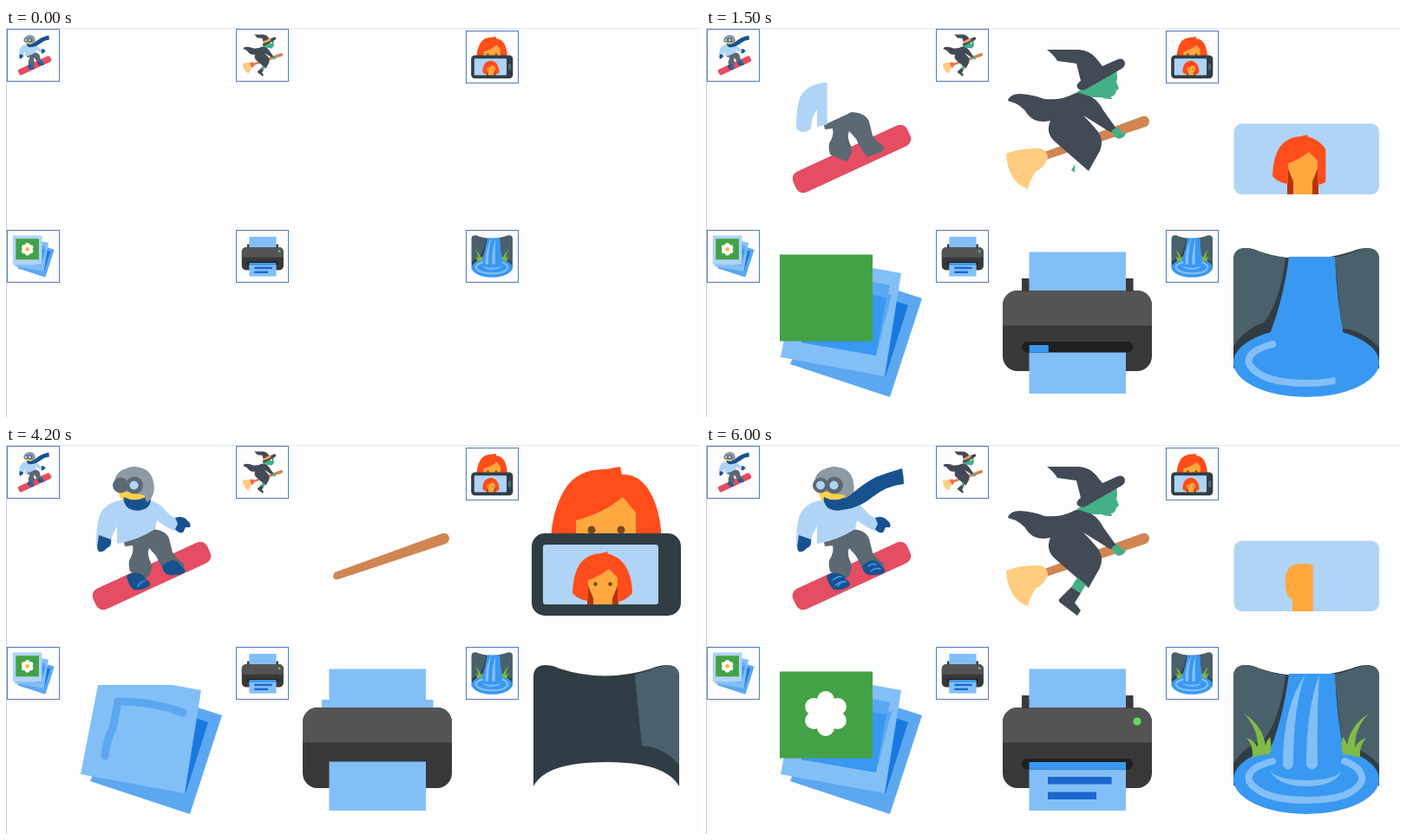
These frames come from a looping animation (800 by 449 pixels, 6100 ms). An HTML page:

```html
<!DOCTYPE html>
<html lang="en">
<head>
<meta charset="utf-8">
<title>Icons drawn layer by layer</title>
<style>
html, body { margin: 0; width: 100%; height: 100%; overflow: hidden; background: #fdfdfd; }
svg { display: block; width: 100vw; height: 100vh; }
</style>
</head>
<body>
<svg id="stage" viewBox="0 0 800 449"></svg>
<script>
const LOOP = 6100, STEP = 100, THUMB_SCALE = 0.28;
const stage = document.getElementById('stage');

const box = (x, y, w, h) => `M${x} ${y}h${w}v${h}h${-w}Z`;
const rounded = (x, y, w, h, r) =>
  `M${x + r} ${y}h${w - 2 * r}a${r} ${r} 0 0 1 ${r} ${r}v${h - 2 * r}a${r} ${r} 0 0 1 ${-r} ${r}` +
  `h${2 * r - w}a${r} ${r} 0 0 1 ${-r} ${-r}v${2 * r - h}a${r} ${r} 0 0 1 ${r} ${-r}Z`;
const oval = (x, y, rx, ry = rx) =>
  `M${x - rx} ${y}a${rx} ${ry} 0 1 1 ${2 * rx} 0a${rx} ${ry} 0 1 1 ${-2 * rx} 0Z`;
const flower = (x, y, reach, r) => oval(x, y, 12) + [...Array(6).keys()].map(i => {
  const a = Math.PI / 2 + i * Math.PI / 3;
  return oval(x + reach * Math.cos(a), y + reach * Math.sin(a), r);
}).join('');
const line = (color, width) =>
  ({ fill: 'none', stroke: color, 'stroke-width': width, 'stroke-linecap': 'round', 'stroke-linejoin': 'round' });
const holed = { 'fill-rule': 'evenodd' };

const PALE = '#b0d4f6', SKY = '#82bff7', MID = '#5ba8f1', BLUE = '#3998f2', NAVY = '#17528f';
const SLATE = '#5c6872', INK = '#424a56', GREEN = '#44b085';
const SKIN = '#ffa83e', HAIR = '#ff4d1c', BROWN = '#784719', SHELL = '#303d44', ROCK = '#4a616b';
const GRASS = 'M630 361Q631 346 623 338Q632 341 636 349Q636 326 620 310Q642 324 645 347Q646 341 650 337Q653 348 650 357Q640 357 630 361Z';

// Each layer: start, end, colour, path, extra attributes.
const icons = [
  { name: 'snowboarder', frame: [1.5, 1.5], thumb: [-14, 1], period: LOOP, layers: [
    [60, 700, '#e44d62', rounded(95.5, 138, 145, 26, 9), { transform: 'rotate(-24.8 168 151)' }],
    [800, 1300, SLATE, 'M136 112L168 97Q184 98 188 108L192 124Q196 131 205 137Q206 143 196 145L186 149L179 140Q176 134 173 128L165 119Q162 126 167 136Q170 145 162 154L143 146Q141 138 142 133Q148 124 146 116L137 117Z'],
    [1300, 1900, PALE, 'M136 63Q114 66 108 81Q104 92 104 116Q112 124 121 116Q121 104 128 94V114Q152 110 172 97L174 87Q180 91 186 95L194 99Q204 98 211 93Q208 88 199 86Q190 83 184 76Q177 66 163 63Z'],
    [1900, 2150, '#fdd04c', 'M146 29Q165 30 165 47L164 55Q160 68 147 69Q132 68 130 55Q126 30 146 29Z'],
    [2150, 2400, NAVY, 'M139 151Q145 146 152 148Q160 150 161 155Q168 158 165 163Q158 168 147 167Q140 160 139 151Z'],
    [2500, 2750, NAVY, 'M180 140Q186 133 193 133Q199 134 201 139Q208 143 206 147Q200 151 188 150Q181 148 180 140Z'],
    [2750, 3000, NAVY, 'M136 60Q150 68 166 57Q169 66 163 72Q152 79 141 73Q134 66 136 60Z'],
    [3000, 3300, NAVY, 'M195 84Q204 81 209 87Q214 91 212 95L207 95L204 101Q198 102 195 97L198 91Z'],
    [3300, 3450, BLUE, 'M152 163Q156 157 160 157', line(BLUE, 1.6)],
    [3520, 3800, '#8d9aa4', 'M146 25Q167 25 170 43Q173 58 163 66Q160 64 160 58L127 52Q119 30 146 25Z'],
    [3800, 3950, NAVY, 'M107 104L121 109Q122 117 116 119Q113 124 107 123Q104 120 106 112Z'],
    [3950, 4100, SLATE, oval(132, 46.5, 9) + oval(148, 46.5, 10)],
    [4100, 4200, PALE, oval(147.5, 46.5, 5)],
    [4300, 4450, PALE, oval(132, 46.5, 5)],
    [4500, 5150, NAVY, 'M136 64Q148 72 166 58Q182 44 196 37Q212 31 226 27Q228 36 228 45Q208 47 192 60Q172 76 150 75Q138 73 136 64Z'],
    [5200, 5600, BLUE, 'M146 156Q152 151 156 152M149 162Q155 157 161 158', line(BLUE, 1.6)],
    [5600, 5950, BLUE, 'M187 140Q192 136 196 138M190 146Q195 141 201 143', line(BLUE, 1.6)]
  ] },
  { name: 'witch', frame: [265.5, 1.5], thumb: [176, 0.5], period: 4000, layers: [
    [30, 180, '#d08552', 'M379 147L503 102Q510 101 511 107Q511 112 507 114L383 155Q377 156 377 151Z'],
    [220, 350, '#ffcc80', 'M346 145Q362 138 386 139Q394 142 394 150Q390 161 381 165Q374 173 371 186Q348 178 346 145Z'],
    [350, 550, INK, 'M348 84Q350 76 362 76Q378 77 390 82Q410 84 426 75Q437 72 445 80Q453 85 458 95L473 116Q470 122 464 119L435 101Q446 112 452 120Q459 130 454 142L441 165L402 131Q391 121 397 107Q380 111 371 100Q364 88 348 84Z'],
    [550, 650, GREEN, 'M427 74L473 49Q475 58 473 62L476 70L473 72Q472 79 467 79L468 82Q460 82 456 80L446 80Z'],
    [650, 780, INK, 'M393 25H430Q442 26 449 34L457 44L475 36Q481 34 483 40Q483 45 479 47L439 70Q432 74 428 69Q426 65 432 61L427 41L405 38Q401 31 393 25Z'],
    [1250, 1450, GREEN, 'M468 118L475 114L480 121L484 121Q483 127 475 128Q469 125 468 118Z'],
    [1450, 1650, GREEN, 'M428 153L438 161L432 171L421 164Z'],
    [1650, 1950, INK, 'M421 164L432 171L425 182L432 191L428 197L407 181V178Z'],
    [2050, 2350, '#ff9c54', 'M431 53Q446 47 457 39L464 47Q450 58 433 62Z'],
    [2500, 2900, '#ff6152', 'M376 141L386 139Q394 142 394 149Q391 158 386 163Q377 155 376 141Z'],
    [3000, 3300, '#fdfdfd', oval(463, 60, 3, 4)]
  ] },
  { name: 'selfie', frame: [530.5, 3.5], thumb: [366.5, 3], period: 5350, layers: [
    [60, 450, PALE, rounded(608.5, 110.5, 167.5, 81.5, 9)],
    [450, 700, SKIN, 'M688 137Q704 137 706 147Q709 154 707 164Q706 176 700 178V192H676V178Q669 176 668 164Q666 152 670 146Q672 137 688 137Z'],
    [900, 1100, '#b83304', 'M670 160L677 177V192H670ZM706 160L699 177V192H706Z'],
    [1100, 1550, HAIR, 'M653 171Q654 126 686 125L694 123L693 125Q721 132 722 171Q714 180 705 181V153L695 143Q682 153 671 156V180Q660 179 653 171Z'],
    [1600, 2300, SKIN, 'M648.5 110.5A52 52 0 1 1 736.5 110.5Z'],
    [2450, 3000, HAIR, 'M628 110.5Q629 78 643 53Q658 27 692 28L708 25L710 34Q735 33 748 66Q755 85 756 110.5H726V78L711 60Q690 78 657 87V110.5Z'],
    [3000, 3400, BROWN, oval(675, 98, 4.5) + oval(709, 98, 4.5)],
    [3500, 4000, SHELL, rounded(606, 102, 172, 95, 15) + rounded(619, 115, 133, 69, 3), holed],
    [4000, 4200, BROWN, oval(679.5, 160.5, 2.2) + oval(696.5, 160.5, 2.2)],
    [4300, 4700, '#5c6e7a', box(760.5, 137, 8.5, 25)]
  ] },
  { name: 'photos', frame: [1.5, 233.5], thumb: [-14, 168.5], period: 3550, layers: [
    [60, 220, MID, 'M140 277L249 312L212 426L97 388Z'],
    [220, 330, '#1a78e0', 'M150 292L233 320L207 402L125 372Z'],
    [330, 450, SKY, 'M106 277H192L225 283L206 402L86 380Z'],
    [450, 650, MID, 'M114 359Q117 336 123 328L129 296Q170 296 204 309', line(MID, 9)],
    [660, 730, MID, 'M124 290L214 308L196 378L110 363Z'],
    [730, 800, BLUE, 'M135 297L208 311L196 378L110 363L121 318Z'],
    [850, 1050, MID, 'M135 282L212 297L209 311L135 297Z'],
    [1100, 1500, '#43a246', box(85, 261.5, 107, 100)],
    [1800, 2300, '#ffffff', flower(138, 310, 16, 10)],
    [2500, 2950, PALE, box(78, 254, 120, 120.5) + box(90.5, 267, 95, 86), holed],
    [2950, 3100, '#ffb62d', oval(138, 310, 8.5)]
  ] },
  { name: 'printer', frame: [265.5, 233.5], thumb: [176, 168.5], period: 3450, layers: [
    [60, 300, SKY, box(372.5, 258.5, 111.5, 45) + box(364, 294, 128.5, 10)],
    [300, 450, '#383838', rounded(342, 303, 172, 93, 17)],
    [450, 600, '#545454', 'M342 343.5V320a17 17 0 0 1 17 -17H497a17 17 0 0 1 17 17V343.5Z'],
    [600, 740, SKY, box(372.5, 365.5, 111.5, 56.5)],
    [900, 1100, '#3a3a3a', box(364, 289, 8.5, 15) + box(484, 289, 8.5, 15)],
    [1150, 1450, '#1f1f1f', rounded(364, 362, 128, 12.5, 6)],
    [1450, 1700, BLUE, box(372.5, 366, 111.5, 8.5)],
    [1800, 2100, '#1a67d0', box(394, 383, 73.5, 8.5)],
    [2100, 2350, '#1a67d0', box(394, 400.5, 56, 8.5)],
    [2410, 2530, '#62d85c', oval(497, 319, 4.6)]
  ] },
  { name: 'waterfall', frame: [530.5, 233.5], thumb: [366.5, 168.5], period: 3450, layers: [
    [60, 500, SHELL, 'M608 394V266Q609 254 622 254Q630 254 638 258Q690 275 744 258Q753 254 762 254Q775 254 776 266V394Q761 366 692 366Q622 366 608 394Z'],
    [500, 740, ROCK, 'M725 265Q744 260 750 257Q757 254 763 254Q776 255 776 267V369Q757 348 733 347Q728 300 725 265Z'],
    [800, 1000, ROCK, 'M608 367V266Q609 254 622 254Q630 254 638 258Q652 264 668 265Q662 316 643 340Q622 347 608 367Z'],
    [1000, 1200, BLUE, oval(692, 386, 84, 40)],
    [1200, 1350, BLUE, 'M672 264H725Q727 315 736 360H647Q665 318 672 264Z'],
    [1350, 1550, SKY, 'M653 365Q622 373 626 388Q640 410 692 410Q745 410 756 388Q758 373 736 365', line(SKY, 8)],
    [1550, 1740, SKY, 'M691 265Q677 300 677 370Q671 379 665 370Q665 300 691 265ZM707 265Q704 310 705 370Q699 379 692 370Q692 305 707 265Z'],
    [1760, 1880, SKY, 'M650 376Q660 394 692 394Q724 394 733 376Q724 387 692 387Q660 387 650 376Z'],
    [1900, 2350, '#80bb45', GRASS],
    [2410, 2540, '#80bb45', GRASS, { transform: 'matrix(-1 0 0 1 1384 0)' }]
  ] }
];

function add(parent, tag, attrs) {
  const node = document.createElementNS('http://www.w3.org/2000/svg', tag);
  for (const key in attrs) node.setAttribute(key, attrs[key]);
  return parent.appendChild(node);
}

const drawLayers = (parent, layers) =>
  layers.map(([, , fill, d, extra]) => add(parent, 'path', { fill, d, ...extra }));

add(stage, 'path', { d: 'M0.5 0V449', stroke: '#c3cade' });
add(stage, 'path', { d: 'M0 0.5H800', stroke: '#e3e7ef' });
for (const icon of icons) {
  const [x, y] = icon.frame, [tx, ty] = icon.thumb;
  icon.paths = drawLayers(add(stage, 'g', {}), icon.layers);
  add(stage, 'rect', { x, y, width: 60, height: 60, fill: '#fdfdfd', stroke: '#5379be' });
  drawLayers(add(stage, 'g', { transform: `translate(${tx} ${ty}) scale(${THUMB_SCALE})` }), icon.layers);
}

// Every layer is wiped in from left to right, then the icon starts over.
function render(time) {
  for (const { period, layers, paths } of icons) {
    const phase = time % period;
    layers.forEach(([start, end], i) => {
      const shown = Math.min(1, (phase - start) / (end - start));
      paths[i].style.display = shown > 0 ? '' : 'none';
      paths[i].style.clipPath = shown < 1 ? `inset(0 ${100 * (1 - shown)}% 0 0)` : 'none';
    });
  }
}

const began = performance.now();
function tick() {
  const time = (performance.now() - began) % LOOP;
  render(Math.floor(time / STEP) * STEP);
  requestAnimationFrame(tick);
}
tick();
</script>
</body>
</html>
```
